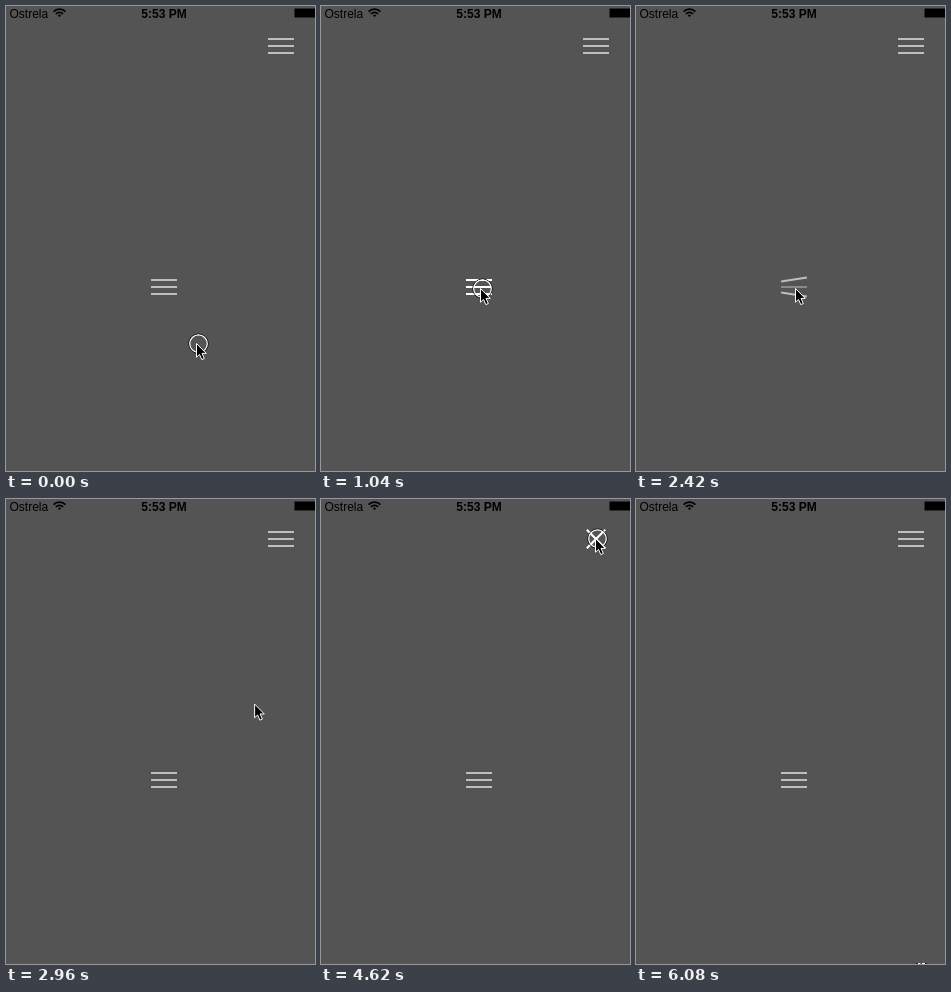
Write an HTML page that moves like this. It is 309x465 px and loops after 6210 ms.

```html
<!DOCTYPE html>
<html lang="en">
<head>
<meta charset="utf-8">
<title>Menu buttons</title>
<style>
  html, body { margin: 0; width: 100%; height: 100%; overflow: hidden; background: #545454; }
  svg { display: block; width: 309px; height: 465px; }
  text { font: 12px "Liberation Sans", Arial, sans-serif; }
  .clock { font-weight: bold; text-anchor: middle; }
  .menu line { stroke-width: 2; }
  .wifi path { fill: none; stroke: #000; stroke-width: 1.8; }
</style>
</head>
<body>
<svg viewBox="0 0 309 465">
  <rect width="309" height="465" fill="#545454"/>
  <text x="3.5" y="11.5">Ostrela</text>
  <g class="wifi">
    <path d="M47.6 5.6a8.3 8.3 0 0 1 11.8 0"/>
    <path d="M49.9 8a5 5 0 0 1 7.2 0"/>
    <path d="M51.9 9.2L53.5 11.2L55.1 9.2Q53.5 7.9 51.9 9.2Z" style="fill:#000;stroke:none"/>
  </g>
  <text class="clock" x="158" y="11.5">5:53 PM</text>
  <rect x="288.5" y="2.5" width="25" height="9" rx="1" fill="#000" stroke="#2b2b2b"/>
  <g class="menu" id="top"><line/><line/><line/></g>
  <g class="menu" id="mid"><line/><line/><line/></g>
  <g id="ring" fill="none">
    <circle r="9.7" stroke="#000"/>
    <circle r="8.8" stroke="#fff" stroke-width="1.2"/>
  </g>
  <path id="arrow" d="M.5 .5V14.2L3.5 11.4L5.8 16.6L8.3 15.5L6 10.4H10.2Z" fill="#000" stroke="#fff"/>
  <g id="hand">
    <rect x="280" y="464" width="11" height="1" fill="#222"/>
    <path d="M282 464.5h2.5m1.5 0h3" stroke="#fff"/>
  </g>
</svg>
<script>
const LOOP = 6210, HALF = 13, GAP = 7, MORPH = 300;
const $ = id => document.getElementById(id);
const clamp = v => Math.max(0, Math.min(1, v));

// press, release and morph times for opening and closing each cross
const buttons = [
  { el: $('mid'), x: 158, y: 281, taps: [[1010, 1160, 1440], [1970, 2120, 2270]] },
  { el: $('top'), x: 275, y: 40, taps: [[3600, 3750, 3980], [4620, 4740, 4890]] }
];
const presses = [[0, 30], ...buttons.flatMap(b => b.taps)];

// pointer runs: time, x, y
const runs = [
  [[0, 190, 337], [30, 190, 337], [410, 170, 303], [650, 160, 284], [710, 159, 282],
   [2700, 159, 282], [2740, 165, 281], [2850, 208, 250], [2960, 248, 205], [3150, 270, 124],
   [3360, 278, 63], [3480, 275, 43], [3560, 274, 39], [5285, 274, 39], [5300, 282, 45], [5320, 282, 45]],
  [[5740, 298, 463], [5790, 295, 461], [5850, 304, 464]]
];

// damped oscillation from 0 to 1 that comes to rest at the end of the morph
function spring(ms, damping) {
  if (ms <= 0) return 0;
  if (ms >= MORPH) return 1;
  const s = ms / 1000, u = ms / MORPH;
  return 1 - Math.cos(27 * s) * Math.exp(-damping * s) * (1 - u * u);
}

function pointer(t) {
  const run = runs.find(r => t >= r[0][0] && t < r[r.length - 1][0]);
  if (!run) return null;
  const i = run.findIndex(p => p[0] > t), a = run[i - 1], b = run[i];
  const k = (t - a[0]) / (b[0] - a[0]);
  return [a[1] + (b[1] - a[1]) * k, a[2] + (b[2] - a[2]) * k];
}

function glow(t, taps) {
  return Math.max(...taps.map(([down, up]) =>
    t < down ? 0 : 1 - clamp((t - up - 30) / 220)));
}

function drawButton({ el, x, y, taps }, t) {
  const [open, close] = taps.map(tap => t - tap[2]);
  const turn = 45 * (spring(open, 5.5) - spring(close, 5.5));
  const shift = GAP * (1 - spring(open, 12) + spring(close, 12));
  const fade = 1 - clamp(open / MORPH) + clamp(close / MORPH);
  const shade = Math.round(190 + 65 * glow(t, taps));
  el.setAttribute('stroke', `rgb(${shade},${shade},${shade})`);
  [-1, 0, 1].forEach((side, i) => {
    el.children[i].setAttribute('transform',
      `translate(${x} ${y + side * shift}) rotate(${-side * turn})`);
  });
  el.children[1].setAttribute('opacity', fade);
}

function place(el, pos, dx = 0, dy = 0) {
  el.style.display = pos ? '' : 'none';
  if (pos) el.setAttribute('transform', `translate(${pos[0] + dx} ${pos[1] + dy})`);
}

function draw(t) {
  buttons.forEach(b => drawButton(b, t));
  const pos = pointer(t);
  const down = presses.some(([a, b]) => t >= a && t < b);
  place($('arrow'), pos);
  place($('ring'), down ? pos : null, 2.5, .7);
  $('hand').style.display = t >= 6080 ? '' : 'none';
}

document.querySelectorAll('.menu line').forEach(line => {
  line.setAttribute('x1', -HALF);
  line.setAttribute('x2', HALF);
});

const start = performance.now();
function tick() {
  draw((performance.now() - start) % LOOP);
  requestAnimationFrame(tick);
}
tick();
</script>
</body>
</html>
```
